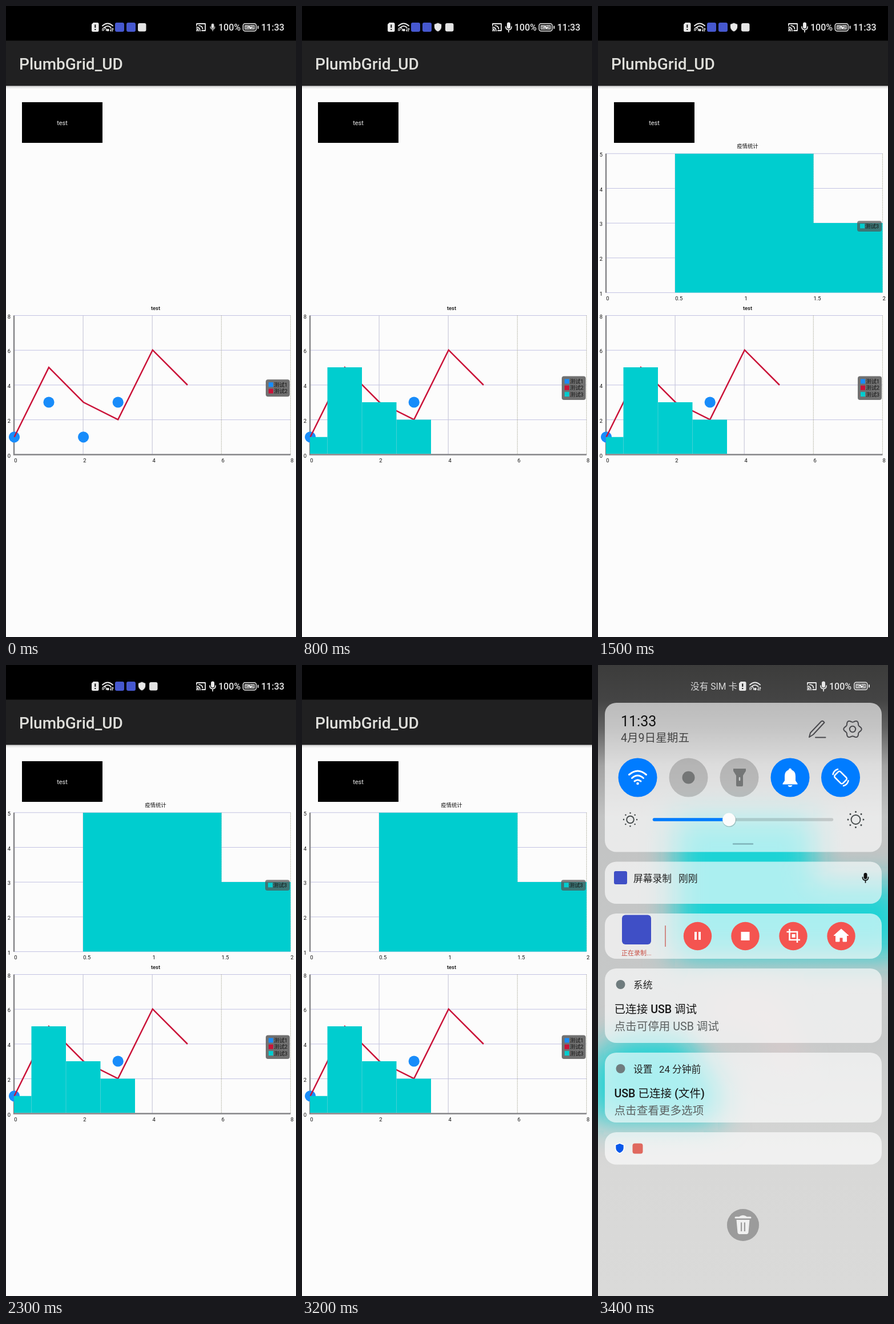
Write an HTML page that moves like this. It is 508 px wide and 1102 px high and loops after 3.5 s.

```html
<!DOCTYPE html>
<html lang="zh">
<head>
<meta charset="utf-8">
<title>Chart demo</title>
<style>
html, body { margin: 0; width: 100%; height: 100%; overflow: hidden; background: #fcfcfc; }
svg { display: block; width: 508px; height: 1102px; font-family: Roboto, "Noto Sans CJK SC", "Noto Sans CJK", sans-serif; }
.line { fill: none; stroke: currentColor; stroke-linecap: round; stroke-linejoin: round; }
.med { font-weight: 500; }
.tick { font-size: 9.4px; fill: #111; }
.bar { fill: #00cdcf; }
.shown, .gone, .mic, .push, .pop, .status, .pulse { animation: 3500ms step-end infinite; }
.shown { animation-name: show-bars; }
.gone { animation-name: hide-old; }
.top { animation-name: show-top; }
.shade { animation-name: show-shade; }
.full { animation-name: show-full; }
.part { animation-name: show-part; }
.status { animation-name: status-out; }
.mic, .pulse, .pop { transform-box: fill-box; transform-origin: center; }
.mic { animation-name: mic-grow; }
.pulse { animation-name: mic-pulse; }
.pop { animation-name: pop; }
.push { animation-name: push; }
@keyframes show-bars { 0% { visibility: hidden } 17.14%, 100% { visibility: visible } }
@keyframes hide-old { 0% { visibility: visible } 17.14%, 100% { visibility: hidden } }
@keyframes show-top { 0% { visibility: hidden } 39.99%, 100% { visibility: visible } }
@keyframes show-shade { 0% { visibility: hidden } 94.28%, 100% { visibility: visible } }
@keyframes show-part { 0% { visibility: hidden } 94.28% { visibility: visible } 97.14%, 100% { visibility: hidden } }
@keyframes show-full { 0% { visibility: hidden } 97.14%, 100% { visibility: visible } }
@keyframes status-out { 0% { opacity: 1 } 85.71% { opacity: .67 } 88.57% { opacity: .33 } 91.42%, 100% { opacity: 0 } }
@keyframes mic-grow { 0% { transform: scale(.76) } 2.85% { transform: scale(.84) } 5.71% { transform: scale(.92) } 8.57%, 100% { transform: none } }
@keyframes mic-pulse { 0% { transform: scale(.87) } 97.14%, 100% { transform: none } }
@keyframes pop { 0% { transform: scale(0) } 2.85% { transform: scale(.4) } 5.71% { transform: scale(.75) } 8.57%, 100% { transform: none } }
@keyframes push { 0% { transform: none } 2.85% { transform: translateX(8px) } 5.71% { transform: translateX(15px) } 8.57%, 100% { transform: translateX(20px) } }
</style>
</head>
<body>
<svg viewBox="0 0 508 1102">
<defs>
  <symbol id="sim" overflow="visible">
    <path fill="currentColor" d="M3 0H10Q12.500 0 12.500 2.500V13.500Q12.500 16 10 16H2.500Q0 16 0 13.500V3Z"/>
    <path stroke="#111" stroke-width="2" d="M6.300 3.500V9M6.300 11V13"/>
  </symbol>
  <symbol id="wifi" overflow="visible">
    <g class="line" stroke-width="2">
      <path d="M1 5.500Q10 -2.500 19 5.500M4.500 8.500Q10 3.500 15.500 8.500"/>
      <path stroke-width="1.300" d="M1 14Q0 9 4.500 9Q8 9 7.500 14M3 14Q3 11 4.500 11.500"/>
      <path stroke-width="1.300" d="M16 10V15M14.600 13.600L16 15M18.600 15V10M18.600 10L20 11.400"/>
    </g>
    <circle cx="10.500" cy="13" r="2.300" fill="currentColor"/>
  </symbol>
  <symbol id="cast" overflow="visible">
    <g class="line" stroke-width="1.800">
      <path d="M1 4V1H16V13H10M1 7Q7 7.500 7 13.500M1 10Q4 10.500 4 13.500"/>
      <path d="M5 4.200Q11 5 11.500 10"/>
    </g>
    <circle cx="1.300" cy="13" r="1.200" fill="currentColor"/>
  </symbol>
  <symbol id="mic" overflow="visible">
    <rect x="3" width="6" height="11" rx="3" fill="currentColor"/>
    <path class="line" stroke-width="1.700" d="M.9 7.500Q.9 13 6 13T11.100 7.500M6 13V17"/>
  </symbol>
  <symbol id="battery" overflow="visible">
    <rect x=".8" y=".8" width="23" height="13" rx="3.500" class="line" stroke-width="1.500"/>
    <rect x="3" y="3" width="18.600" height="8.600" rx="1.500" fill="currentColor" opacity=".7"/>
    <path fill="#fff" stroke="#222" stroke-width=".6" d="M5 8L13 3.500V6.500H20L12 11.500V8Z"/>
    <path class="line" stroke-width="2" d="M27 5.500V9"/>
  </symbol>
  <symbol id="shield" overflow="visible">
    <path fill="currentColor" d="M0 -9L7.500 -6V0Q7 6 0 9Q-7 6 -7.500 0V-6Z"/>
    <path class="line" d="M-3.500 -.5L-.8 2.200L3.800 -2.600"/>
  </symbol>
  <linearGradient id="dim" x2="0" y2="1">
    <stop stop-color="#3c3c3b"/><stop offset=".055" stop-color="#444"/>
    <stop offset=".1" stop-color="#626262"/><stop offset=".16" stop-color="#a2a2a2"/>
    <stop offset=".24" stop-color="#c2c3c3"/><stop offset=".6" stop-color="#c8caca"/>
    <stop offset=".8" stop-color="#d8d8d7"/><stop offset="1" stop-color="#dadad9"/>
  </linearGradient>
  <linearGradient id="drop" x2="0" y2="1"><stop stop-color="#bbb"/><stop offset="1" stop-color="#fcfcfc"/></linearGradient>
  <filter id="blur" x="-50%" y="-50%" width="200%" height="200%"><feGaussianBlur stdDeviation="27"/></filter>
  <clipPath id="cut"><rect x="12" y="434" width="485" height="56.500" rx="20"/></clipPath>
  <g id="tools">
    <rect x="42" y="436.500" width="51" height="51.500" rx="6" fill="#3f4fc6"/>
    <path d="M118 455V492" stroke="#c9574f" stroke-width="1.300"/>
    <g fill="#f45450"><circle cx="174.500" cy="473.500" r="24.700"/><circle cx="258" cy="473.500" r="24.700"/><circle cx="342" cy="473.500" r="24.700"/><circle cx="426" cy="473.500" r="24.700"/></g>
    <g fill="#fff">
      <path d="M169 466h4v14h-4zM176 466h4v14h-4zM250.500 466h15v15h-15z"/>
      <path d="M426 461L439 472.500H435.500V483H429V476H423V483H416.500V472.500H413Z" stroke="#fff" stroke-linejoin="round"/>
    </g>
    <path d="M335.500 461V480H354M330.500 466H349V485" fill="none" stroke="#fff" stroke-width="2.600"/>
    <rect x="339.500" y="470" width="6" height="6" fill="#fff"/>
    <text x="41" y="507" font-size="11" fill="#c94f45">正在录制...</text>
  </g>
</defs>

<rect width="508" height="1102" fill="#fcfcfc"/>
<rect y="139" width="508" height="6" fill="url(#drop)" opacity=".7"/>
<rect width="508" height="61" fill="#000"/>
<rect y="60.500" width="508" height="79" fill="#202021"/>
<text x="23" y="111" class="med" font-size="28" fill="#dfdfdb">PlumbGrid_UD</text>
<g class="status" color="#e9e9e9">
  <use href="#sim" x="150" y="29"/>
  <use href="#wifi" x="168" y="29"/>
  <rect x="191" y="29" width="16" height="16" rx="3" fill="#4658cf"/>
  <rect x="211" y="29" width="16" height="16" rx="3" fill="#4658cf"/>
  <g class="pop"><use href="#shield" transform="translate(238 37) scale(.92)" stroke="#111" stroke-width="1.800"/></g>
  <rect class="push" x="231" y="30" width="14.500" height="14.500" rx="3" fill="#e4e4e4"/>
  <use href="#cast" x="333" y="30"/>
  <g class="mic"><use href="#mic" x="356" y="28.500"/></g>
  <g class="med" font-size="16" fill="#e9e9e9"><text x="372" y="43">100%</text><text x="447" y="43">11:33</text></g>
  <use href="#battery" x="414.500" y="30"/>
</g>
<rect x="28" y="168" width="141" height="71" fill="#000"/>
<text x="98.500" y="208" font-size="11" fill="#eee" text-anchor="middle">test</text>

<g id="low"></g>
<g fill="#188cfa"><circle cx="14.500" cy="752.800" r="9.600"/><circle cx="75" cy="692" r="9.600"/><circle cx="135.600" cy="752.800" r="9.600"/><circle cx="196.200" cy="692" r="9.600"/></g>
<path d="M14.500 752.800L75 631.200L135.600 692L196.200 722.400L256.800 600.800L318 662" fill="none" stroke="#ca1238" stroke-width="2.500"/>
<g class="shown">
  <path class="bar" d="M14 752.800H44.500V631H105V692H165.500V722.500H226V782H14Z"/>
  <path d="M44.500 753V782M105 692V782M165.500 722V782" stroke="#62d2d6" stroke-width=".7"/>
</g>
<g class="gone" id="key2"></g>
<g class="shown" id="key3"></g>
<g class="shown top">
  <g id="high"></g>
  <path class="bar" d="M135 258H377.500V379H498.500V500.500H135Z"/>
  <g id="key1"></g>
</g>

<g class="shown shade">
  <rect width="508" height="1102" fill="url(#dim)"/>
  <g filter="url(#blur)" fill="#1dd3d5">
    <path d="M135 265H377V380H540V510H135Z"/>
    <path d="M-15 690L45 650H150L210 735V795H-15Z"/>
    <path d="M200 600L300 600L340 710" fill="none" stroke="#e7c9cb" stroke-width="22"/>
  </g>
  <g color="#e6e6e6">
    <text x="162" y="43" font-size="15.700" fill="#d8d8d8">没有 SIM 卡</text>
    <use href="#sim" x="247" y="29"/>
    <use href="#wifi" x="265" y="29"/>
    <use href="#cast" x="366" y="30"/>
    <g class="pulse"><use href="#mic" x="389" y="28.500"/></g>
    <text x="405" y="43" class="med" font-size="16" fill="#e6e6e6">100%</text>
    <use href="#battery" x="448" y="29.500"/>
  </g>
  <g fill="#fff" fill-opacity=".63">
    <rect x="12" y="66" width="485" height="260.500" rx="20"/>
    <rect x="12" y="343.500" width="485" height="73.500" rx="20"/>
  </g>
  <text x="40" y="107" font-size="25" fill="#111">11:33</text>
  <text x="40" y="134" font-size="19.600" fill="#444">4月9日星期五</text>
  <g class="line" color="#4a4a4e" stroke-width="2">
    <path d="M370 126L372 118.500L391 98.500Q394 96.500 396.500 100.500L377 121.500ZM381 126.500H398.500"/>
    <path id="gear"/><circle cx="446" cy="112" r="5.200"/>
  </g>
  <g fill="#007cff"><circle cx="69.500" cy="196.500" r="34"/><circle cx="336.500" cy="196.500" r="34"/><circle cx="425" cy="196.500" r="34"/></g>
  <g fill-opacity=".18"><circle cx="158.500" cy="196.500" r="34"/><circle cx="247.500" cy="196.500" r="34"/></g>
  <g class="line" color="#fff" stroke-width="3">
    <path d="M54.500 191.500Q69.500 178.500 84.500 191.500M59.500 197.500Q69.500 188.500 79.500 197.500M64 203Q69.500 198.500 75 203"/>
    <circle cx="69.500" cy="207" r="1.500" fill="#fff" stroke-width="1.500"/>
    <g stroke-width="2.500">
      <rect x="418" y="186.500" width="14" height="20" rx="3" transform="rotate(-45 425 196.500)"/>
      <path d="M411.500 191Q413 184 420 182M438.500 202Q437 209 430 211"/>
    </g>
  </g>
  <circle cx="158.500" cy="196.500" r="11" fill="#747676"/>
  <path d="M237 181H259V185L254 193V210Q254 212 252 212H244Q242 212 242 210V193L237 185Z" fill="#747676"/>
  <path d="M248 197V201" class="line" color="#c5c8c8" stroke-width="2.500"/>
  <path d="M336.500 180.500Q339 180.500 339 183Q346 185.500 346 194V202L349.500 207V208.500H323.500V207L327 202V194Q327 185.500 334 183Q334 180.500 336.500 180.500ZM332.500 210H340.500Q339.500 213 336.500 213T332.500 210Z" fill="#fff"/>
  <g class="line" color="#454b4c" stroke-width="1.900">
    <circle cx="56.500" cy="270" r="6.300"/><circle cx="451.500" cy="270" r="8"/>
    <circle cx="56.500" cy="270" r="11.500" pathLength="8" stroke-dasharray=".01 .99" stroke-width="2.600"/>
    <circle cx="451.500" cy="270" r="13.500" pathLength="8" stroke-dasharray=".01 .99" stroke-width="3"/>
  </g>
  <g class="line" stroke-width="5.500">
    <path d="M98.500 270H409.500" opacity=".14"/><path d="M98.500 270H230" color="#007cff"/>
    <path d="M237 312.500H271" color="#7fb3b9" stroke-width="2.400"/>
  </g>
  <circle cx="230" cy="271" r="12" opacity=".18"/>
  <circle cx="229.500" cy="270" r="11.400" fill="#fcfcfc"/>
  <rect x="28" y="360" width="23" height="23" rx="3" fill="#3f4fc6"/>
  <g font-size="16.800" fill="#222"><text x="62" y="378.500">屏幕录制</text><text x="141" y="378.500">刚刚</text></g>
  <use href="#mic" x="462.500" y="363" color="#111"/>
  <g fill="#8f8f8f"><circle cx="254" cy="978" r="28" opacity=".68"/><circle class="full" cx="254" cy="978" r="28" opacity=".5"/></g>
  <path d="M241 965H267M249 964Q254 961 259 964" class="line" color="#f0f0f0" stroke-width="3"/>
  <path d="M242.500 969H265.500L263.500 991Q263 994 260 994H248Q245 994 244.500 991ZM250 973.500V989H252.200V973.500ZM255.800 973.500V989H258V973.500Z" fill="#f0f0f0" fill-rule="evenodd"/>
</g>

<g class="shown part">
  <g fill="#fff" fill-opacity=".63"><rect x="12" y="434" width="485" height="56.500" rx="20"/><rect x="12" y="508" width="485" height="56" rx="20"/></g>
  <g clip-path="url(#cut)"><use href="#tools" y="-5.700"/></g>
  <g fill="#6f7c7e"><circle cx="42" cy="536" r="7"/><circle cx="73" cy="536" r="7"/></g>
  <use href="#shield" x="104" y="536" color="#0a58ea" stroke="#fff" stroke-width="1.600"/>
  <rect x="126" y="527" width="18" height="18" rx="4" fill="#e0695f"/>
</g>

<g class="shown full">
  <g fill="#fff" fill-opacity=".63">
    <rect x="12" y="434" width="485" height="79" rx="20"/>
    <rect x="12" y="530" width="485" height="130" rx="20"/>
    <rect x="12" y="677" width="485" height="122" rx="20"/>
    <rect x="12" y="816" width="485" height="56.500" rx="20"/>
  </g>
  <use href="#tools"/>
  <g fill="#6f7c7e"><circle cx="39.500" cy="558" r="8"/><circle cx="39.500" cy="705" r="8"/></g>
  <g font-size="16.800" fill="#222"><text x="62" y="565">系统</text><text x="62" y="712">设置</text><text x="107" y="712">24 分钟前</text></g>
  <g font-size="19.600">
    <g class="med" fill="#161616"><text x="28.500" y="607.500">已连接 USB 调试</text><text x="28.500" y="754.500">USB 已连接 (文件)</text></g>
    <g fill="#5c6060"><text x="28.500" y="637.500">点击可停用 USB 调试</text><text x="28.500" y="784.500">点击查看更多选项</text></g>
  </g>
  <use href="#shield" x="38" y="844" color="#0a58ea" stroke="#fff" stroke-width="1.600"/>
  <rect x="60.500" y="835.500" width="18" height="18" rx="4" fill="#e0695f"/>
</g>
</svg>
<script>
const put = (id, html) => document.getElementById(id).innerHTML = html;
const text = (x, y, s, extra = '') => `<text class="tick" x="${x}" y="${y}" ${extra}>${s}</text>`;
const stroke = (d, color, w = 1, extra = '') => `<path d="${d}" stroke="${color}" stroke-width="${w}" fill="none" ${extra}/>`;

function chart(id, top, title, xs, ys, axis) {
  const bottom = top + 243;
  let out = text(262, top - 9.500, title, 'text-anchor="middle" font-weight="500"');
  for (let i = 0; i < 5; i++) {
    const x = 14 + i * 121.100, y = top + i * 60.700;
    out += stroke(`M14 ${y}H498.500`, '#c3c3e2');
    out += i > 2 ? stroke(`M${x} ${top}V${bottom}`, '#b4b4a4', 1, 'stroke-dasharray="2 1"')
                 : stroke(`M${x} ${top}V${bottom}`, '#c0c0d4');
    out += text(x + .2, bottom + 13.200, xs[i]) + text(2.700, y + 5.200, ys[i]);
  }
  out += stroke(`M14 ${top}V${bottom}` + (axis ? 'H498.500' : ''), '#858588', 2.500);
  put(id, out);
}

const colors = ['#188cfa', '#ca1238', '#00cdcf'];
function legend(id, x, y, h, first, last, fill) {
  let out = `<rect x="${x}" y="${y}" width="${497 - x}" height="${h}" rx="4" fill="${fill}"/>`;
  for (let n = first; n <= last; n++) {
    const mid = y + 9 + (n - first) * 11.300;
    out += `<rect x="${x + 5}" y="${mid - 4}" width="8" height="8" fill="${colors[n - 1]}"/>`
      + text(x + 14, mid + 3.400, '测试' + n);
  }
  put(id, out);
}

chart('low', 540.500, 'test', [0, 2, 4, 6, 8], [8, 6, 4, 2, 0], true);
chart('high', 257.800, '疫情统计', [0, .5, 1, 1.5, 2], [5, 4, 3, 2, 1], false);
legend('key2', 455, 652.300, 30, 1, 2, '#717171');
legend('key3', 455, 646.500, 41.500, 1, 3, '#717171');
legend('key1', 454, 375.300, 18.700, 3, 3, 'rgba(85,85,85,.72)');

const rim = Array.from({ length: 48 }, (_, i) => {
  const a = i * Math.PI / 24, r = 14 + 1.800 * Math.cos(6 * a);
  return (446 + r * Math.cos(a)).toFixed(1) + ' ' + (112 + r * Math.sin(a)).toFixed(1);
});
document.getElementById('gear').setAttribute('d', 'M' + rim.join('L') + 'Z');
</script>
</body>
</html>
```
